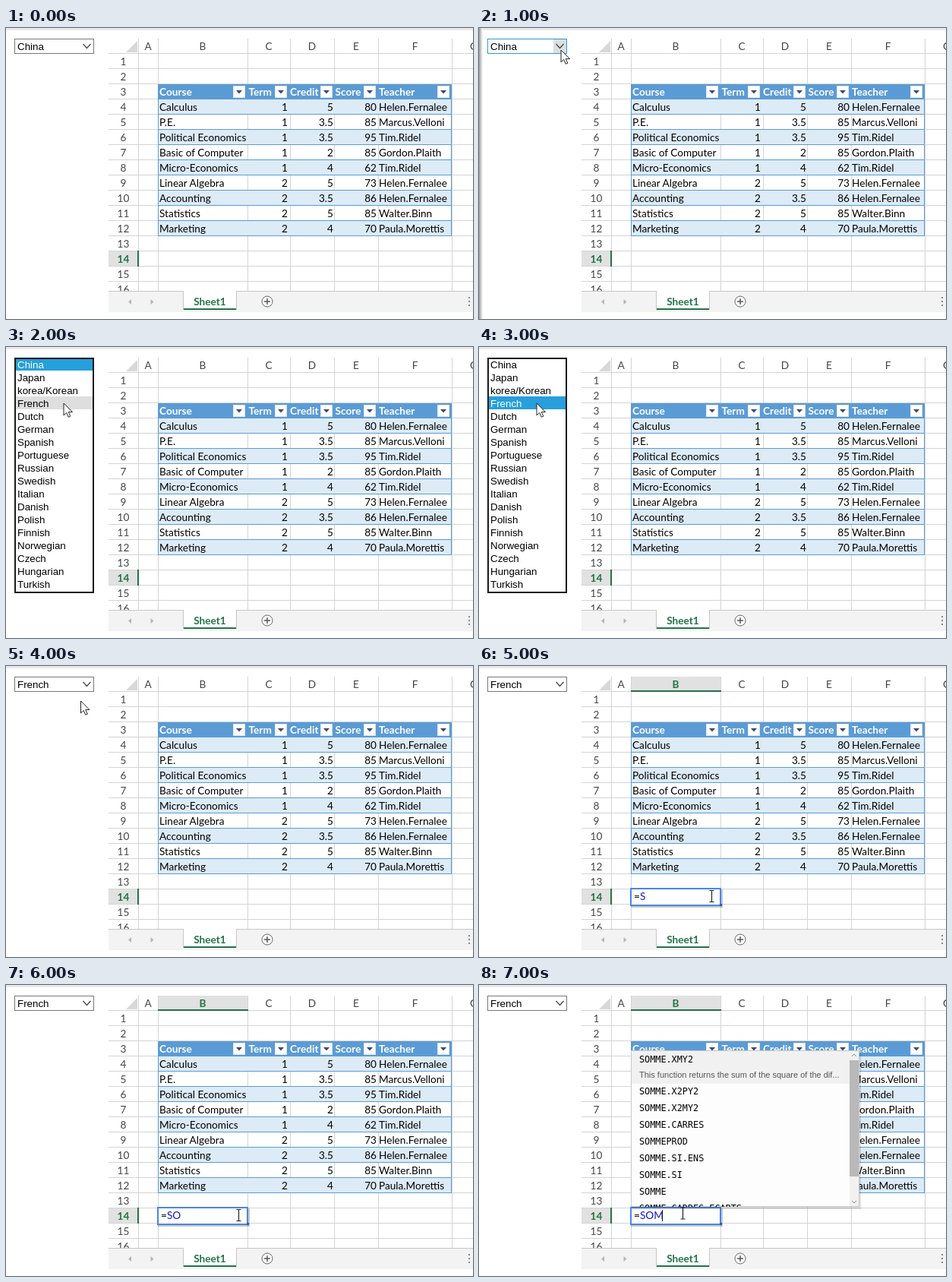
Animation, 615 px wide and 383 px high, one loop 8000 ms. Source, as an HTML page:

```html
<!DOCTYPE html>
<html lang="en">
<head>
<meta charset="utf-8">
<title>Spreadsheet language picker</title>
<style>
html, body { margin: 0; width: 100%; height: 100%; overflow: hidden; background: #fff; }
svg { display: block; width: 615px; height: 383px; }
text { font: 13.65px Lato, sans-serif; fill: #000; white-space: pre; }
.b { font-weight: 700; }
.ui { font: 13.33px "Liberation Sans", Arial, sans-serif; }
.code { font: 11.8px "DejaVu Sans Mono", monospace; }
.hint { font: 11px "Liberation Sans", Arial, sans-serif; fill: #555; }
.on { opacity: 0; animation: 8s step-end infinite; }
.w1 { animation-name: w1; }
.w2 { animation-name: w2; }
.w3 { animation-name: w3; }
.w4 { animation-name: w4; }
@keyframes w1 { 0% { opacity: 1 } 12.5%, 100% { opacity: 0 } }
@keyframes w2 { 0% { opacity: 1 } 25%, 100% { opacity: 0 } }
@keyframes w3 { 0% { opacity: 1 } 37.5%, 100% { opacity: 0 } }
@keyframes w4 { 0% { opacity: 1 } 50%, 100% { opacity: 0 } }
</style>
</head>
<body>
<svg id="stage" viewBox="0 0 615 383">
  <defs>
    <linearGradient id="edge"><stop stop-color="#999"/><stop offset="1" stop-color="#fff"/></linearGradient>
    <clipPath id="sheetClip"><rect x="135" y="14" width="480" height="332"/></clipPath>
    <clipPath id="popClip"><rect x="201" y="87" width="287" height="205"/></clipPath>
  </defs>
</svg>
<script>
const GREEN = '#217346', BLUE = '#5b9bd5', LINE = '#d4d4d4';
const cols = [174, 200, 318, 374, 432, 490, 587, 645];
const rowY = r => 14 + r * 20;

const rect = (x, y, w, h, fill, more = '') =>
  `<rect x="${x}" y="${y}" width="${w}" height="${h}" fill="${fill}" ${more}/>`;
const path = (d, fill, more = '') => `<path d="${d}" fill="${fill}" ${more}/>`;
const stroke = (d, color, width = 1) =>
  path(d, 'none', `stroke="${color}" stroke-width="${width}"`);
const text = (x, y, s, cls = '', more = '') =>
  `<text x="${x}" y="${y}" class="${cls}" ${more}>${s}</text>`;
const mid = 'text-anchor="middle"', end = 'text-anchor="end"';

// Shows content from one second to another within the loop.
const on = (from, to, html) =>
  `<g class="on w${to - from}" style="animation-delay:${from - 8}s">${html}</g>`;

const courses = [
  ['Calculus', 1, 5, 80, 'Helen.Fernalee'],
  ['P.E.', 1, 3.5, 85, 'Marcus.Velloni'],
  ['Political Economics', 1, 3.5, 95, 'Tim.Ridel'],
  ['Basic of Computer', 1, 2, 85, 'Gordon.Plaith'],
  ['Micro-Economics', 1, 4, 62, 'Tim.Ridel'],
  ['Linear Algebra', 2, 5, 73, 'Helen.Fernalee'],
  ['Accounting', 2, 3.5, 86, 'Helen.Fernalee'],
  ['Statistics', 2, 5, 85, 'Walter.Binn'],
  ['Marketing', 2, 4, 70, 'Paula.Morettis']
];

function grid() {
  let s = path('M173 17v15h-15z', '#d8d8d8');
  cols.forEach(x => s += rect(x, 14, 1, 332, LINE));
  for (let r = 1; r <= 16; r++) s += rect(135, rowY(r) - 1, 480, 1, LINE);
  s += rect(135, rowY(14), 39, 19, '#e1e1e1') + rect(173, rowY(14) - 1, 2, 21, GREEN);
  for (let r = 1; r <= 16; r++) {
    const active = r === 14;
    s += text(154.5, rowY(r) + 15, r, active ? 'b' : '',
      `${mid} style="fill:${active ? GREEN : '#444'}"`);
  }
  [...'ABCDEFG'].forEach((c, i) =>
    s += text((cols[i] + cols[i + 1]) / 2, 29, c, '', `${mid} style="fill:#444"`));
  return s;
}

function table() {
  let s = rect(200, 74, 387, 20, BLUE);
  const heads = [['Course', 202, 307], ['Term', 319.5, 362], ['Credit', 374, 422],
    ['Score', 433.5, 479], ['Teacher', 491, 576]];
  heads.forEach(([name, x, cx]) => {
    s += text(x, 89, name, 'b', 'style="fill:#fff"');
    s += rect(cx - 7.5, 76.5, 15, 15, '#fff', 'stroke="#dfe6ee"');
    s += path(`M${cx - 4} 82h8l-4 4.5z`, '#3b4a6b');
  });
  courses.forEach(([course, term, credit, score, teacher], i) => {
    const y = rowY(i + 4);
    if (i % 2 === 0) s += rect(200, y, 387, 20, '#ddebf7');
    s += rect(200, y + 19, 387, 1, BLUE);
    s += text(202, y + 15, course) + text(371, y + 15, term, '', end) +
      text(431, y + 15, credit, '', end) + text(488, y + 15, score, '', end) +
      text(491, y + 15, teacher);
  });
  return s + stroke('M200.5 74V273.5H586.5V74', BLUE);
}

function tabs() {
  return rect(135, 346, 480, 28, '#f3f3f3') + rect(135, 346, 480, 1, '#c6c6c6') +
    path('M165 357v7l-4-3.5z M190.500 357v7l4-3.500z', '#b5b5b5') +
    rect(234, 346, 69, 25, '#fff') + stroke('M233.5 346V371 M303.5 346V371', '#c6c6c6') +
    rect(234, 369, 69, 2, GREEN) +
    text(268.5, 365, 'Sheet1', 'b', `${mid} style="fill:${GREEN}"`) +
    `<circle cx="344" cy="360" r="7" fill="#fff" stroke="#666"/>` +
    stroke('M340 360h8M344 356v8', '#555', 1.5) +
    [355, 360, 365].map(y => rect(609, y - 1, 2, 2, '#888')).join('');
}

function select(value, focus) {
  return rect(11.5, 14.5, 104, 19, '#fff', `stroke="${focus ? '#2b9bd7' : '#777'}"`) +
    (focus ? rect(98, 15, 17, 18, '#dedede') : '') +
    stroke('M101.500 21l5 5.500l5-5.500', '#444', 1.2) +
    text(15, 29, value, 'ui');
}

const languages = ('China Japan korea/Korean French Dutch German Spanish Portuguese Russian ' +
  'Swedish Italian Danish Polish Finnish Norwegian Czech Hungarian Turkish').split(' ');

function list(picked, hover) {
  const rows = languages.map((name, i) => {
    const bg = i === picked ? '#269fdb' : i === hover ? '#dedede' : '#fff';
    return rect(13, 14 + i * 17, 101, 17, bg) +
      text(15, 28 + i * 17, name, 'ui', i === picked ? 'style="fill:#fff"' : '');
  });
  return rows.join('') + rect(12, 15, 103, 308, 'none', 'stroke="#1a1a1a" stroke-width="2"');
}

const arrow = (x, y) => path(`M${x} ${y}v16l3.700-3.500l2.500 5.800l2.600-1.100l-2.500-5.600h5.200z`,
  '#fff', 'stroke="#222" stroke-linejoin="round"');

const ibeam = (x, y) => stroke(
  `M${x - 3} ${y - 7.5}h2.500l.5 .5l.5-.5h2.500M${x} ${y - 7}v14M${x - 3} ${y + 7.5}h2.500l.5-.5l.5 .5h2.500`,
  '#222', 1.2);

const typed = s => text(204, 308, `=<tspan style="fill:#1414e0">${s}</tspan>`);

function editor() {
  return rect(201, 14, 117, 19, '#e1e1e1') + rect(200, 32, 119, 2, GREEN) +
    text(259, 29, 'B', 'b', `${mid} style="fill:${GREEN}"`) +
    rect(200, 294, 121, 24, '#000', 'opacity=".22"') +
    rect(200, 293, 118, 22, '#fff', 'stroke="#4a86e8" stroke-width="2"') +
    rect(317, 313, 3, 3, '#2f5fb5');
}

function popup() {
  const names = ['X2PY2', 'X2MY2', 'CARRES', '', 'SI.ENS', 'SI', '', 'CARRES.ECARTS'];
  let items = text(211, 102, 'SOMME.XMY2', 'code') +
    text(211, 122, 'This function returns the sum of the square of the dif...', 'hint');
  names.forEach((n, i) => {
    const word = i === 3 ? 'SOMMEPROD' : n ? 'SOMME.' + n : 'SOMME';
    items += text(211, 144 + i * 22, word, 'code');
  });
  return rect(201, 88, 302, 207, '#000', 'opacity=".12"') +
    rect(200.5, 86.5, 300, 205, '#fdfdfd', 'stroke="#c8c8c8"') +
    rect(201, 87, 287, 43, '#f1f1f1') +
    `<g clip-path="url(#popClip)">${items}</g>` +
    rect(488, 87, 12, 204, '#f1f1f1') + rect(488, 99, 12, 153, '#b9b9b9') +
    stroke('M491 94l3-3l3 3M491 284l3 3l3-3', '#888');
}

document.getElementById('stage').innerHTML += [
  rect(0, 0, 615, 3, '#e9e9e9'),
  on(1, 2, rect(0, 0, 5, 383, 'url(#edge)')),
  `<g clip-path="url(#sheetClip)">${grid()}${table()}</g>`,
  tabs(),
  on(0, 1, select('China')),
  on(1, 2, select('China', true) + arrow(108, 29)),
  on(2, 3, list(0, 3)),
  on(3, 4, list(3)),
  on(2, 4, arrow(76, 74)),
  on(4, 8, select('French')),
  on(4, 5, arrow(98.5, 46)),
  on(5, 8, editor()),
  on(5, 6, typed('S')),
  on(6, 7, typed('SO')),
  on(5, 7, ibeam(306.5, 303)),
  on(7, 8, popup() + typed('SOM') + rect(241, 296, 1, 15, '#111') + ibeam(268.5, 300.5))
].join('');
</script>
</body>
</html>
```
